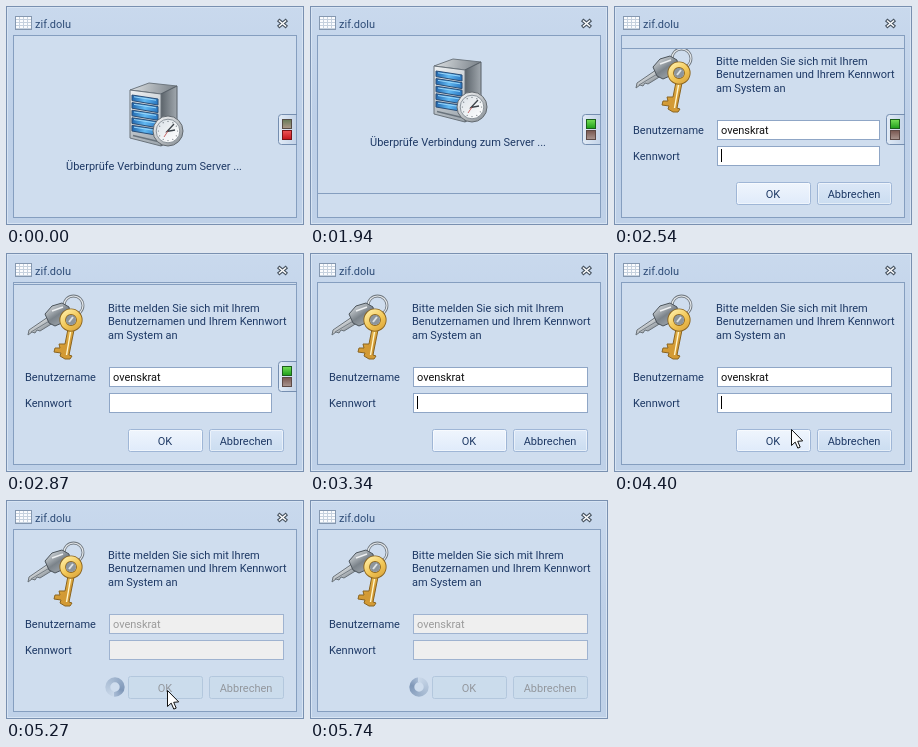
These frames come from a looping animation (298 by 219 pixels, 5800 ms). An HTML page with a canvas:

```html
<!DOCTYPE html>
<html lang="de">
<head>
<meta charset="utf-8">
<title>Anmeldung</title>
<style>
  html, body { margin: 0; width: 100%; height: 100%; overflow: hidden; background: #c3d4ea; }
  canvas { display: block; }
</style>
</head>
<body>
<canvas id="stage" width="298" height="219"></canvas>
<script>
const LOOP = 5800;
const ctx = document.getElementById('stage').getContext('2d');
const INK = '#1e3965', LINE = '#859ebf', PANEL = '#cfddee', GREY = '#93979d';

function rect(x, y, w, h, fill, stroke) {
  if (fill) { ctx.fillStyle = fill; ctx.fillRect(x, y, w, h); }
  if (stroke) { ctx.strokeStyle = stroke; ctx.lineWidth = 1; ctx.strokeRect(x + .5, y + .5, w - 1, h - 1); }
}

function rounded(x, y, w, h, r, fill, stroke) {
  ctx.beginPath();
  ctx.roundRect(x + .5, y + .5, w - 1, h - 1, r);
  ctx.fillStyle = fill;
  ctx.fill();
  ctx.lineWidth = 1;
  ctx.strokeStyle = stroke;
  ctx.stroke();
}

function poly(points, fill, stroke) {
  ctx.beginPath();
  points.forEach(([x, y]) => ctx.lineTo(x, y));
  ctx.closePath();
  if (fill) { ctx.fillStyle = fill; ctx.fill(); }
  if (stroke) { ctx.strokeStyle = stroke; ctx.lineWidth = 1; ctx.stroke(); }
}

function path(points, color, width) {
  ctx.beginPath();
  points.forEach(([x, y]) => ctx.lineTo(x, y));
  ctx.strokeStyle = color;
  ctx.lineWidth = width;
  ctx.stroke();
}

function disc(x, y, r, fill, stroke, width = 1) {
  ctx.beginPath();
  ctx.arc(x, y, r, 0, Math.PI * 2);
  if (fill) { ctx.fillStyle = fill; ctx.fill(); }
  if (stroke) { ctx.strokeStyle = stroke; ctx.lineWidth = width; ctx.stroke(); }
}

function blend(x0, y0, x1, y1, ...colors) {
  const g = ctx.createLinearGradient(x0, y0, x1, y1);
  colors.forEach((c, i) => g.addColorStop(i / (colors.length - 1), c));
  return g;
}

function text(str, x, y, color = INK, align = 'left') {
  ctx.font = '11px Roboto, "Open Sans", sans-serif';
  ctx.textAlign = align;
  ctx.fillStyle = color;
  ctx.fillText(str, x, y);
}

function drawWindow() {
  rect(0, 0, 298, 219, blend(0, 0, 0, 219, '#c9d9ed', '#bed0e8', '#bfd1e8'), '#7990b0');
  rect(1, 1, 296, 217, null, '#d7e4f3');
  rect(7, 29, 284, 183, PANEL, LINE);

  rect(9, 10, 17, 14, '#fbfcfe', '#8598b0');
  for (let x = 13; x < 25; x += 4) rect(x, 11, 1, 12, '#c6d1de');
  for (let y = 13; y < 23; y += 3) rect(10, y, 15, 1, '#c6d1de');
  text('zif.dolu', 29, 22, '#2f4d78');

  ctx.lineCap = 'square';
  for (const [color, width] of [['#46525f', 3.6], ['#ffffff', 1.5]]) {
    path([[273.5, 15], [279.5, 20]], color, width);
    path([[279.5, 15], [273.5, 20]], color, width);
  }
  ctx.lineCap = 'butt';
}

function drawServer() {
  poly([[124, 84], [143, 77], [171, 80], [155, 88]], blend(124, 77, 170, 88, '#dfe3e6', '#777f86'), '#6f7880');
  poly([[155, 88], [171, 80], [171, 130], [155, 140]], blend(155, 0, 171, 0, '#5c646b', '#a1a8ae'), '#565e66');
  poly([[124, 84], [155, 88], [155, 140], [124, 132]], blend(124, 84, 155, 140, '#eef1f3', '#9aa3ab'), '#6a737b');
  for (let i = 0; i < 5; i++) {
    const y = 89 + i * 7.6;
    poly([[126, y], [152, y + 4], [152, y + 10], [126, y + 5.6]],
      blend(126, y, 152, y + 10, '#1a5fa8', '#62b9f2', '#2471bd'), '#2b4f78');
    path([[128, y + 1.8], [150, y + 5.2]], '#9ad7fb', 1);
  }
  path([[127, 129.5], [152, 135.5]], '#69737c', 1.5);

  disc(162, 125, 15, blend(150, 112, 174, 140, '#f3f4f5', '#888f95'), '#62696f');
  disc(162, 125, 11.8, blend(152, 114, 172, 136, '#dde3e8', '#ffffff'), '#8c949b');
  for (let i = 0; i < 12; i++) {
    const a = i * Math.PI / 6;
    disc(162 + 9.6 * Math.cos(a), 125 + 9.6 * Math.sin(a), .6, '#707980');
  }
  path([[168, 118], [161, 125.5], [169, 124]], '#3c4349', 1.3);
  path([[162, 125], [158, 131]], '#b44', .8);
}

function drawKeys() {
  disc(67.5, 52.5, 9.5, null, '#6f777f', 2.8);
  disc(67.5, 52.5, 9.5, null, '#e2e6e9', 1.2);

  poly([[42, 64], [47, 70], [34, 78], [31, 77], [29, 80], [26, 79], [22, 82], [23, 77]],
    blend(28, 68, 36, 80, '#f2f4f5', '#868e95'), '#6a7279');
  path([[25, 79], [45, 67]], '#777f86', 1);
  poly([[39, 61], [46, 53], [56, 50], [63, 54], [64, 61], [58, 69], [49, 73], [43, 70]],
    blend(44, 52, 58, 73, '#d3d8dc', '#7b838a', '#a4abb1'), '#4b535a');
  path([[46, 58], [57, 54]], '#eef0f2', 1.5);

  const gold = blend(52, 60, 70, 84, '#fff0ac', '#f2c655', '#d39a34');
  poly([[62, 76], [68, 77], [65, 92], [63, 102], [66, 103], [64, 106], [59, 106], [54, 103],
    [55, 100], [48, 99], [49, 95], [54, 95], [53, 91], [59, 91]], gold, '#8a6420');
  disc(65, 67, 8.3, null, '#8a6420', 6.6);
  disc(65, 67, 8.3, null, gold, 4.8);
  disc(65, 67, 5, '#8d959c');
  path([[63, 69], [67, 64]], '#dfe3e6', 2);
  path([[64.5, 79], [60.5, 102]], '#fff6cc', 1.4);
}

function drawField(y, width, value, off) {
  rect(103, y, width, 20, off ? '#efefef' : '#ffffff', off ? '#9fb3d0' : '#8fa6c6');
  text(value, 107, y + 14, off ? '#9b9b9b' : '#111111');
}

function drawButton(x, label, off, focus, light) {
  if (focus) {
    ctx.setLineDash([1, 1]);
    ctx.lineDashOffset = .5;
    rect(x + 3, 179, 70, 18, null, '#1b3550');
    ctx.setLineDash([]);
  } else if (off) {
    rounded(x, 176, 75, 23, 2, '#cbdcec', '#b3c7dd');
  } else {
    const fill = light ? blend(0, 176, 0, 199, '#f0f6fd', '#dfeafa') : blend(0, 176, 0, 199, '#dce8f7', '#cadcf0');
    rounded(x, 176, 75, 23, 2, fill, '#9fb6d6');
    rounded(x + 1, 177, 73, 21, 1, 'transparent', 'rgba(255,255,255,.5)');
  }
  text(label, x + 37, 192, off ? GREY : INK, 'center');
}

function drawForm(t, hide) {
  const off = t >= 4740, focus = off && t < 4870;
  drawKeys();
  ['Bitte melden Sie sich mit Ihrem', 'Benutzernamen und Ihrem Kennwort', 'am System an']
    .forEach((line, i) => text(line, 102, 59 + i * 13.3));
  text('Benutzername', 19, 128);
  text('Kennwort', 19, 154);
  const width = 163 + Math.round(12 * hide);
  drawField(114, width, 'ovenskrat', off);
  drawField(140, width, '', off);
  const caret = t < 2800 || (t >= 3340 && t < 3870) || t >= 4400;
  if (caret && !off) rect(107, 143, 1, 13, '#000000');
  drawButton(122, 'OK', off, focus, true);
  drawButton(203, 'Abbrechen', off, focus, false);
}

function drawPanel(shift) {
  const bottom = 211 - shift;
  rect(8, 30, 282, bottom - 30, PANEL);
  ctx.save();
  ctx.beginPath();
  ctx.rect(8, 30, 282, bottom - 30);
  ctx.clip();
  ctx.translate(0, -shift);
  drawServer();
  text('Überprüfe Verbindung zum Server ...', 148, 164, INK, 'center');
  ctx.restore();
  rect(8, bottom, 282, 1, LINE);
}

function drawLamp(y, top, bottom, edge) {
  rect(276, y, 10, 10, blend(0, y, 0, y + 10, top, bottom), edge);
}

function drawTab(online, hide) {
  ctx.save();
  ctx.beginPath();
  ctx.rect(8, 30, 283, 181);
  ctx.clip();
  ctx.translate(Math.round(19 * hide), 0);
  rounded(272, 108, 24, 31, 3, blend(272, 0, 291, 0, '#e3ecf7', '#c2d2e7'), '#758eb0');
  rect(290, 109, 1, 29, LINE);
  if (online) {
    drawLamp(113, '#7be35a', '#189a16', '#1b5f1b');
    drawLamp(124, '#75524b', '#ad9a94', '#5d4a46');
  } else {
    drawLamp(113, '#627a55', '#b09a8c', '#554d45');
    drawLamp(124, '#f0585a', '#c01018', '#761318');
  }
  ctx.restore();
}

function drawSpinner(tick) {
  const g = ctx.createConicGradient(tick * Math.PI / 7.5, 109, 187);
  g.addColorStop(0, '#cbd9ea');
  g.addColorStop(.45, '#a3b7d0');
  g.addColorStop(.8, '#7f97b8');
  g.addColorStop(1, '#a9bcd5');
  disc(109, 187, 7.2, null, g, 5);
}

function drawPointer(t) {
  if (t < 4200 || t >= 5740) return;
  const k = Math.min(1, (t - 4200) / 400), ease = (1 - k) ** 2;
  const away = Math.max(0, (t - 5340) / 270) ** 2;
  ctx.save();
  ctx.translate(161.5 + 64 * ease - 8 * away, 190.5 - 56 * ease + 32 * away);
  poly([[0, 0], [0, 16], [3.7, 12.6], [6.3, 18.6], [8.7, 17.6], [6.2, 11.8], [11.2, 11.4]], '#ffffff', '#111111');
  ctx.restore();
}

function render(time) {
  const t = Math.floor(time / 10) * 10;
  const tick = Math.floor(t * .015 + 1e-6);
  const step = Math.min(t, Math.ceil(tick / .15 - 1e-6) * 10);
  const hide = Math.max(0, Math.min(1, (tick - 46) / 4));

  drawWindow();
  if (t >= 2000) drawForm(t, hide);
  if (t < 1940) drawPanel(0);
  else if (t < 3000) {
    const s = (step - 1940) / 200;
    drawPanel(182 - Math.floor(158.5 * Math.exp(-.722 * s - .037 * s * s)));
  }
  if (hide < 1) drawTab(t >= 1940, hide);
  if (t >= 4870) drawSpinner(tick);
  drawPointer(step);
}

const start = performance.now();
function loop() {
  render((performance.now() - start) % LOOP);
  requestAnimationFrame(loop);
}
loop();
</script>
</body>
</html>
```
